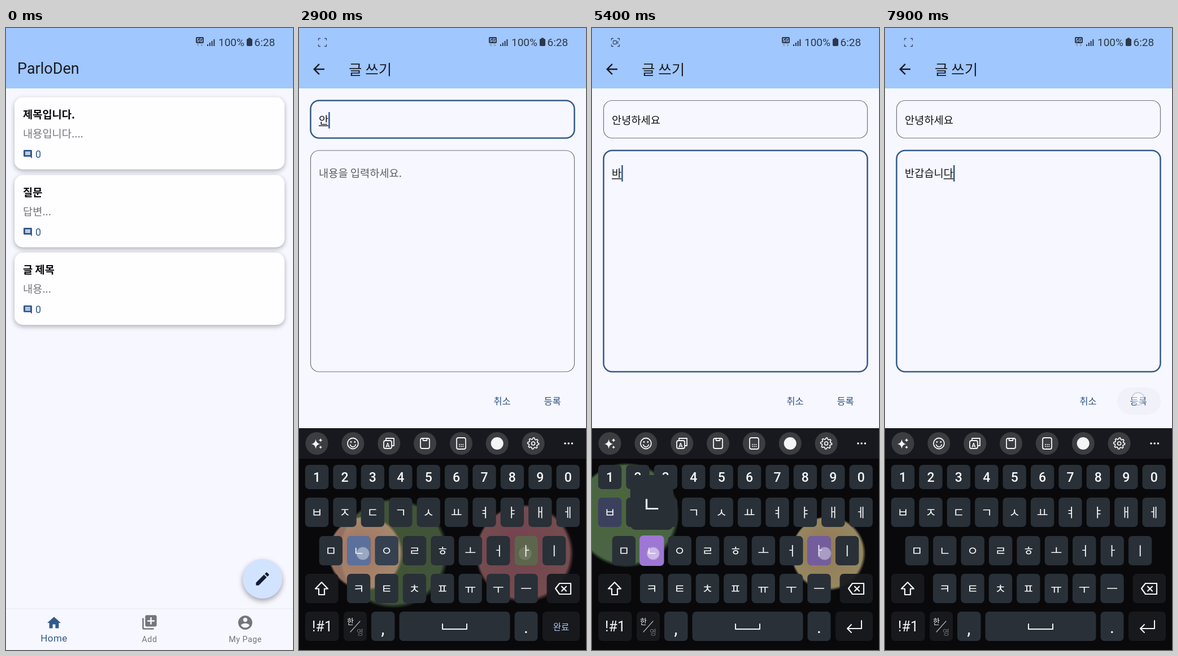
Animation of 508 by 1102 pixels, one loop 8 s. Source, as an HTML page with a canvas:

```html
<!DOCTYPE html>
<html lang="ko">
<head>
<meta charset="utf-8">
<title>Write a post</title>
<style>
html, body { margin: 0; width: 100%; height: 100%; overflow: hidden; background: #f7f7ff; }
canvas { display: block; width: 508px; height: 1102px; }
</style>
</head>
<body>
<canvas id="stage" width="508" height="1102"></canvas>
<script>
const ctx = document.getElementById('stage').getContext('2d');
const W = 508, H = 1102, LOOP = 8000, STEP = 100;
const KR = '"Noto Sans CJK KR", "Noto Sans CJK", sans-serif';
const LATIN = 'Roboto, sans-serif';
const BLUE = '#315a8c', GRAY = '#75767b', INK = '#1a1c22', PAGE = '#f7f7ff';
const PITCH = 49.4;

const icons = {
  home: 'M10 20v-6h4v6h5v-8h3L12 3 2 12h3v8z',
  add: 'M4 6H2v14c0 1.1.9 2 2 2h14v-2H4V6zm16-4H8c-1.1 0-2 .9-2 2v12c0 1.1.9 2 2 2h12c1.1 0 2-.9 2-2V4c0-1.1-.9-2-2-2zm-1 9h-4v4h-2v-4H9V9h4V5h2v4h4v2z',
  user: 'M12 2C6.48 2 2 6.48 2 12s4.48 10 10 10 10-4.48 10-10S17.52 2 12 2zm0 3c1.66 0 3 1.34 3 3s-1.34 3-3 3-3-1.34-3-3 1.34-3 3-3zm0 14.2c-2.5 0-4.71-1.28-6-3.22.03-1.99 4-3.08 6-3.08 1.99 0 5.97 1.09 6 3.08-1.29 1.94-3.5 3.22-6 3.22z',
  edit: 'M3 17.25V21h3.75L17.81 9.94l-3.75-3.75L3 17.25zM20.71 7.04c.39-.39.39-1.02 0-1.41l-2.34-2.34c-.39-.39-1.02-.39-1.41 0l-1.83 1.83 3.75 3.75 1.83-1.83z',
  note: 'M20 2H4c-1.1 0-2 .9-2 2v12c0 1.1.9 2 2 2h14l4 4V4c0-1.1-.9-2-2-2zm-2 12H6v-2h12v2zm0-3H6V9h12v2zm0-3H6V6h12v2z',
  back: 'M20 11H7.83l5.59-5.59L12 4l-8 8 8 8 1.41-1.41L7.83 13H20v-2z',
  star: 'M10 4Q11 12 18 13Q11 14 10 22Q9 14 2 13Q9 12 10 4zM19 2Q19.500 5.500 23 6Q19.500 6.500 19 10Q18.500 6.500 15 6Q18.500 5.500 19 2zM19 16Q19.500 18.500 22 19Q19.500 19.500 19 22Q18.500 19.500 16 19Q18.500 18.500 19 16z'
};
for (const k in icons) icons[k] = new Path2D(icons[k]);

// time, key, bubble hue, key hue, bubble shift
const titleKeys = [
  [2560, 'ㅇ', 90, 215, 12], [2670, 'ㅏ', 345, 70, -3], [2770, 'ㄴ', 8, 220, 12],
  [3020, 'ㄴ', 200, 40, 4], [3160, 'ㅕ', 130, 300, 8], [3290, 'ㅇ', 30, 180, -5],
  [3610, 'ㅎ', 227, 330, -3], [3710, 'ㅏ', 345, 95, -19], [3790, 'ㅅ', 60, 210, -7],
  [3920, 'ㅔ', 280, 20, -6], [4110, 'ㅇ', 170, 250, 5], [4240, 'ㅛ', 15, 140, 9]
];
const bodyKeys = [
  [5120, 'ㅂ', 95, 240, 30], [5270, 'ㅏ', 33, 265, 16], [5370, 'ㄴ', 120, 265, 4],
  [5620, 'ㄱ', 210, 30, -6], [5750, 'ㅏ', 320, 110, 5], [5890, 'ㅂ', 95, 280, 8],
  [6060, 'ㅅ', 72, 265, -7], [6130, 'ㅡ', 285, 180, -17], [6290, 'ㅂ', 20, 200, 10],
  [6430, 'ㄴ', 230, 60, 6], [6560, 'ㅣ', 50, 320, -8], [6690, 'ㄷ', 160, 20, 3], [6820, 'ㅏ', 260, 90, 7]
];
const titleText = 'ㅇ 아 안 안ㄴ 안녀 안녕 안녕ㅎ 안녕하 안녕핫 안녕하세 안녕하셍 안녕하세요'.split(' ');
const bodyText = 'ㅂ 바 반 반ㄱ 반가 반갑 반값 반갑스 반갑습 반갑습ㄴ 반갑습니 반갑습닏 반갑습니다'.split(' ');
const strokes = [...titleKeys, ...bodyKeys];
const taps = [[1080, 452, 978], [1790, 61, 183], [4660, 96, 270], [7860, 448, 657]];
const recOn = [[700, 1500], [5000, 6500]];
const FOCUS = 1880, SWITCH = 4720, TYPE_LAG = 80;

const rows = [
  ['1234567890', 31.6, 795.5, 43],
  ['ㅂㅈㄷㄱㅅㅛㅕㅑㅐㅔ', 31.6, 858, 52],
  ['ㅁㄴㅇㄹㅎㅗㅓㅏㅣ', 56.4, 926, 52],
  ['ㅋㅌㅊㅍㅠㅜㅡ', 105.6, 993, 52]
];
const keys = {};
for (const [chars, x, y, h] of rows)
  [...chars].forEach((c, i) => keys[c] = { x: x + i * PITCH, y, h });

const clamp = v => Math.max(0, Math.min(1, v));
const ease = v => { v = clamp(v); return v * v * (3 - 2 * v); };

function box(x, y, w, h, r, fill, stroke, lw) {
  ctx.beginPath();
  ctx.roundRect(x, y, w, h, r);
  if (fill) { ctx.fillStyle = fill; ctx.fill(); }
  if (stroke) { ctx.strokeStyle = stroke; ctx.lineWidth = lw; ctx.stroke(); }
}
function disc(x, y, r, fill, stroke, lw) {
  box(x - r, y - r, 2 * r, 2 * r, r, fill, stroke, lw);
}
function text(s, x, y, size, color, { font = KR, weight = 400, align = 'left', space = 0 } = {}) {
  ctx.font = `${weight} ${size}px ${font}`;
  ctx.textAlign = align;
  ctx.letterSpacing = space + 'px';
  ctx.fillStyle = color;
  ctx.fillText(s, x, y);
}
function icon(name, x, y, scale, color) {
  ctx.save();
  ctx.translate(x, y);
  ctx.scale(scale, scale);
  ctx.translate(-12, -12);
  ctx.fillStyle = color;
  ctx.fill(icons[name]);
  ctx.restore();
}
function line(points, color, lw, close) {
  ctx.beginPath();
  points.forEach(([x, y], i) => i ? ctx.lineTo(x, y) : ctx.moveTo(x, y));
  if (close) ctx.closePath();
  ctx.strokeStyle = color;
  ctx.lineWidth = lw;
  ctx.lineJoin = ctx.lineCap = 'round';
  ctx.stroke();
}
function shadow(blur, dy, alpha) {
  ctx.shadowColor = `rgba(0,0,0,${alpha})`;
  ctx.shadowBlur = blur;
  ctx.shadowOffsetY = dy;
}

function topBar() {
  ctx.fillStyle = PAGE;
  ctx.fillRect(0, 0, W, H);
  ctx.fillStyle = '#a0c7fe';
  ctx.fillRect(0, 0, W, 107);
}
function statusBar(t) {
  const c = '#2c384b';
  box(336, 16, 14, 11, 2, c);
  text('5G', 343, 25, 9, '#a0c7fe', { font: LATIN, weight: 700, align: 'center' });
  line([[340, 32], [340, 28], [338, 30]], '#6f8299', 1);
  line([[346, 28], [346, 32], [348, 30]], '#6f8299', 1);
  for (let i = 0; i < 4; i++) {
    ctx.fillStyle = c;
    ctx.fillRect(356 + i * 3.8, 29 - i * 3, 2, 3 + i * 3);
  }
  text('100%', 376, 32, 19, c, { font: LATIN });
  box(426, 19, 10, 13, 2, c);
  ctx.fillRect(429, 17.5, 4, 2);
  text('6:28', 439.5, 32, 19, c, { font: LATIN });
  if (t < 100) return;
  for (const sx of [-1, 1]) for (const sy of [-1, 1]) {
    const x = 41.5 + sx * 7, y = 25.5 + sy * 7;
    line([[x - sx * 3, y], [x, y], [x, y - sy * 3]], '#3c4c66', 1.3);
  }
  if (recOn.some(([a, b]) => t >= a && t < b)) {
    box(37.5, 22.5, 6, 6, 1.5, null, '#3c4c66', 1.3);
    line([[44, 25.5], [46, 23.5], [46, 27.5]], '#3c4c66', 1, true);
  }
}

function card(y, title, body) {
  ctx.save();
  shadow(8, 3, .3);
  box(15, y, 478, 128, 15, '#fefdff');
  ctx.restore();
  text(title, 30, y + 37, 18.7, '#08080a', { weight: 700 });
  text(body, 30, y + 71, 18.7, GRAY);
  icon('note', 38.500, y + 101, .75, BLUE);
  text('0', 52, y + 107, 18, BLUE, { font: LATIN });
}
function home(t) {
  topBar();
  text('ParloDen', 20, 81, 27, INK, { font: LATIN });
  card(122.5, '제목입니다.', '내용입니다....');
  card(260.5, '질문', '답변...');
  card(398, '글 제목', '내용...');
  ctx.save();
  shadow(10, 4, .35);
  disc(454, 976, 35, t >= 1100 ? '#bfd0ee' : '#d2e3ff');
  ctx.restore();
  icon('edit', 454, 976, 1.28, '#131b35');
  ctx.fillStyle = '#eef0f8';
  ctx.fillRect(0, 1028, W, 2);
  icon('home', 85, 1054, 1.2, BLUE);
  icon('add', 254, 1053, 1.27, GRAY);
  icon('user', 423.5, 1053.5, 1.25, GRAY);
  const mid = { font: LATIN, align: 'center', space: .5 };
  text('Home', 85, 1087, 17, BLUE, mid);
  text('Add', 254, 1088, 14.300, GRAY, mid);
  text('My Page', 423.5, 1088, 14.300, GRAY, mid);
}

function typed(list, states, t) {
  const n = list.filter(s => s[0] + TYPE_LAG <= t).length;
  return { value: n ? states[n - 1] : '', at: n ? list[n - 1][0] + TYPE_LAG : 0 };
}
function field(y, h, base, focused, hint, entry, focusAt, t) {
  box(20.5, y, 467, h, 15, null, focused ? BLUE : '#717278', focused ? 2.5 : 1.2);
  const { value, at } = entry;
  text(value || hint, 35, base, 18.7, value ? '#111216' : '#5d5e64');
  if (!focused) return;
  const end = 35 + (value ? ctx.measureText(value).width : 1);
  if (value) {
    const w = ctx.measureText(value.slice(-1)).width;
    ctx.fillStyle = '#111216';
    ctx.fillRect(end - w, base + 2.5, w, 1.4);
  }
  if ((t - Math.max(at, focusAt)) % 1000 < 500) {
    ctx.fillStyle = BLUE;
    ctx.fillRect(end, base - 21, 2.5, 29);
  }
}
function write(t) {
  topBar();
  icon('back', 35, 73, 1.25, INK);
  text('글 쓰기', 88, 83, 25.5, INK);
  const lift = t < 1850 ? 393 : 393 * Math.exp((1850 - t) / 87);
  const inBody = t >= SWITCH;
  field(128.500, 66.5, 170, t >= FOCUS && !inBody, '제목', typed(titleKeys, titleText, t), FOCUS, t);
  field(217, 392 + lift, 264, inBody, '내용을 입력하세요.', typed(bodyKeys, bodyText, t), SWITCH, t);
  if (t >= 7860) box(411, 637 + lift, 77, 48, 24, '#f0f1f9');
  for (const [s, x] of [['취소', 359.5], ['등록', 448.5]])
    text(s, x, 667 + lift, 16.400, '#2d5285', { weight: 500, align: 'center' });
}

function toolbar() {
  const w = '#f4f5f7', y = 736;
  ctx.fillStyle = '#17191e';
  ctx.fillRect(0, 709, W, 54);
  for (let i = 0; i < 7; i++) disc(31.5 + i * 63.85, y, 20, '#3b3d41');
  icon('star', 31.5, y, .95, w);
  disc(95.4, y, 9.5, null, w, 1.8);
  disc(92, 733.5, 1.4, w);
  disc(98.8, 733.5, 1.4, w);
  ctx.beginPath();
  ctx.arc(95.4, 737, 5, .3, Math.PI - .3);
  ctx.stroke();
  box(150, 731, 14, 14, 3, null, w, 1.8);
  line([[154, 731], [154, 727], [168, 727], [168, 740], [164, 740]], w, 1.8);
  text('A', 157, 742.5, 11, w, { font: LATIN, weight: 700, align: 'center' });
  box(215, 727, 16, 18, 3, null, w, 1.8);
  box(219.500, 727, 7, 4, 1, null, w, 1.8);
  box(279, 726, 16, 20, 3, null, w, 1.8);
  for (let i = 0; i < 6; i++) disc(284 + i % 3 * 3.2, 738 + (i / 3 | 0) * 3.5, 1, w);
  disc(350.7, y, 11, w);
  const gear = [];
  for (let i = 0; i < 32; i++) {
    const a = i * Math.PI / 16, r = i % 4 < 2 ? 10 : 7.6;
    gear.push([414.6 + r * Math.cos(a), y + r * Math.sin(a)]);
  }
  line(gear, w, 1.7, true);
  disc(414.6, y, 3, null, w, 1.7);
  for (let i = 0; i < 3; i++) disc(471 + i * 6.2, y, 1.8, w);
}
function bubbles(t) {
  for (const [at, c, hue, , dx] of strokes) {
    const age = t - at;
    if (age < 40 || age > 750) continue;
    const x = keys[c].x + dx, y = keys[c].y + 5;
    const r = 105 * (1 - Math.exp(-age / 130));
    const g = ctx.createRadialGradient(x - r * .25, y - r * .2, 0, x, y, r);
    g.addColorStop(0, `hsl(${hue},48%,62%)`);
    g.addColorStop(.93, `hsl(${hue + 12},42%,66%)`);
    g.addColorStop(1, `hsla(${hue + 12},42%,60%,0)`);
    ctx.globalAlpha = .95 * (1 - age / 750) ** 1.5;
    disc(x, y, r, g);
    ctx.globalAlpha = 1;
  }
}
function tints(t) {
  for (const [at, c, , hue] of strokes) {
    const age = t - at, k = keys[c];
    if (age < 20 || age > 750) continue;
    const grow = age < 90 ? 1 : 0;
    ctx.globalAlpha = age < 95 ? 1 : .9 * Math.exp((80 - age) / 150);
    box(k.x - 20.7 - grow, k.y - k.h / 2 - grow, 41.4 + 2 * grow, k.h + 2 * grow, 7, `hsl(${hue},52%,65%)`);
    ctx.globalAlpha = 1;
  }
}
function functionKeys(t) {
  const w = '#f4f5f7', dark = 'rgba(24,26,30,.93)', key = '#293037';
  const mid = { font: LATIN, align: 'center' };
  box(11, 967, 58.500, 52, 7, dark);
  box(438.5, 967, 58.5, 52, 7, dark);
  box(11, 1034, 59.500, 52, 7, dark);
  box(79, 1034, 41, 52, 7, dark);
  box(128, 1034, 41.5, 52, 7, key);
  box(177.5, 1034, 196, 52, 7, key);
  box(381.5, 1034, 41, 52, 7, key);
  box(431, 1034, 66, 52, 7, dark);
  line([[40, 982], [51, 993.5], [45, 993.5], [45, 1004], [35, 1004], [35, 993.5], [29, 993.5]], w, 2.2, true);
  line([[454, 993], [461, 984], [481, 984], [481, 1003], [461, 1003]], w, 2.2, true);
  line([[465, 989.5], [473, 997.5]], w, 2.2);
  line([[473, 989.5], [465, 997.5]], w, 2.2);
  text('!#1', 41, 1069, 25, w, mid);
  text('한', 91, 1056, 13, w, { align: 'center' });
  text('영', 108, 1075, 13, '#73767a', { align: 'center' });
  line([[91, 1070], [108, 1051]], '#b5b7ba', 1.2);
  text(',', 148.500, 1074, 32, w, mid);
  text('.', 402, 1072, 32, w, mid);
  line([[254, 1056], [254, 1065], [297, 1065], [297, 1056]], w, 2);
  if (t < SWITCH) return text('완료', 464, 1067, 15.5, '#a9c6f8', { align: 'center' });
  line([[477, 1050], [477, 1064], [452, 1064]], w, 2);
  line([[459, 1057], [452, 1064], [459, 1071]], w, 2);
}
function keyLabels() {
  for (const c in keys) {
    const k = keys[c], digit = c < 'A';
    text(c, k.x, k.y + 8.300, digit ? 23 : 22, '#f7f8fa',
      { font: digit ? LATIN : KR, weight: 500, align: 'center' });
  }
}
function popups(t) {
  for (const [at, c] of strokes) {
    const age = t - at, k = keys[c];
    if (age < 20 || age > 115) continue;
    box(k.x - 38, k.y - 134, 76, 97, 9, '#282f35');
    text(c, k.x, k.y - 68, 39, '#f7f8fa', { align: 'center' });
  }
}
function keyboard(t) {
  if (t < 1850) return;
  ctx.save();
  ctx.translate(0, 393 * Math.exp((1850 - t) / 75));
  ctx.fillStyle = '#09090c';
  ctx.fillRect(0, 709, W, 393);
  bubbles(t);
  toolbar();
  for (const c in keys) {
    const k = keys[c];
    box(k.x - 20.7, k.y - k.h / 2, 41.4, k.h, 7, '#293037');
  }
  functionKeys(t);
  tints(t);
  keyLabels();
  popups(t);
  ctx.restore();
}

function touches(t) {
  const dots = strokes.map(([at, c, , , dx]) => [at, keys[c].x + dx * .6, keys[c].y + 5, 270]);
  for (const [at, x, y, life = 370] of [...taps, ...dots]) {
    const age = t - at;
    if (age < 0 || age > life) continue;
    ctx.globalAlpha = clamp((life - age) / (life - 100));
    disc(x, y, 11, 'rgba(255,255,255,.48)', 'rgba(160,168,190,.55)', 1.3);
    ctx.globalAlpha = 1;
  }
}

// The write page fades in over the home page.
const layer = document.createElement('canvas');
layer.width = W;
layer.height = H;
function draw(t) {
  const fade = ease((t - 1130) / 470);
  write(t);
  if (fade < 1) {
    const copy = layer.getContext('2d');
    copy.drawImage(ctx.canvas, 0, 0);
    home(t);
    ctx.globalAlpha = fade;
    ctx.drawImage(layer, 0, 0);
    ctx.globalAlpha = 1;
  }
  statusBar(t);
  keyboard(t);
  touches(t);
}

const start = performance.now();
function tick() {
  const t = (performance.now() - start) % LOOP;
  draw(Math.floor(t / STEP) * STEP);
  requestAnimationFrame(tick);
}
tick();
</script>
</body>
</html>
```
